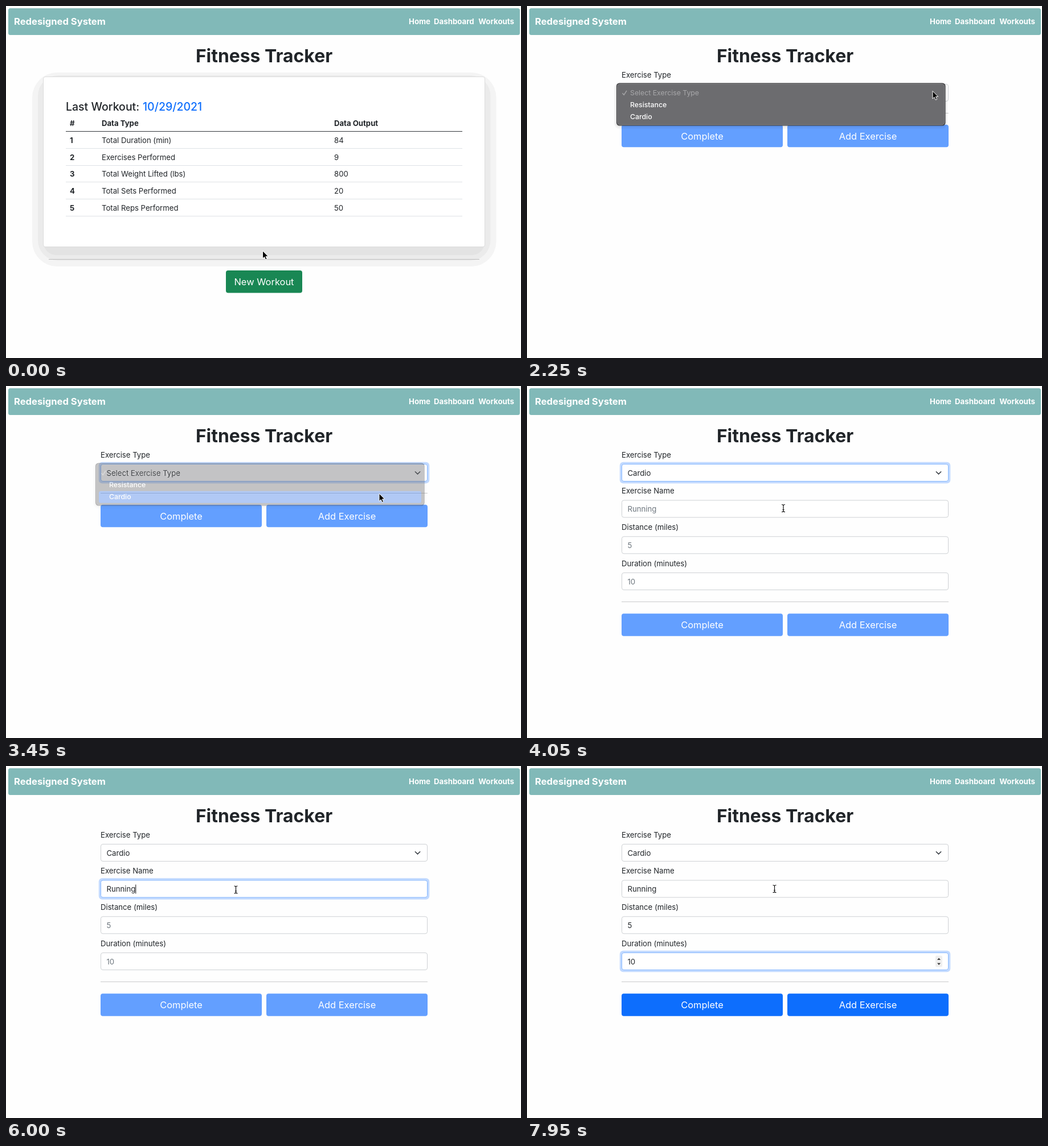
Animation, 904 px wide and 619 px high, one loop 8 s. Source, as an HTML page:

```html
<!DOCTYPE html>
<html lang="en">
<head>
<meta charset="utf-8">
<title>Fitness Tracker</title>
<style>
  html, body { margin: 0; width: 100%; height: 100%; overflow: hidden; background: #fefefe; }
  svg { display: block; width: 904px; height: 619px; }
  text { font: 13.15px Inter, "Liberation Sans", sans-serif; font-optical-sizing: none; fill: #212529; white-space: pre; }
</style>
</head>
<body>
<svg id="stage" viewBox="0 0 904 619"></svg>
<script>
const LOOP = 8000;
const stage = document.getElementById('stage');

// Each step changes part of the state and holds until the next one.
const steps = [
  [0, { page: 'home', cursor: 'arrow', x: 450.5, y: 430.5, type: 'Select Exercise Type',
        name: '', distance: '', duration: '', ring: 1, ready: 0 }],
  [150, { y: 453 }],
  [300, { x: 450, y: 491, cursor: 'hand', hover: true }],
  [600, { pressed: true }],
  [1050, { page: 'form', cursor: 'arrow' }],
  [1500, { x: 530, y: 440 }],
  [1650, { x: 690, y: 320 }],
  [1800, { x: 849, y: 225 }],
  [1950, { x: 795, y: 176 }],
  [2100, { x: 712, y: 149.5 }],
  [2250, { menu: 1 }],
  [2550, { x: 694, y: 166, pick: 1 }],
  [2700, { x: 668, y: 184, pick: 2 }],
  [2850, { x: 655, y: 189 }],
  [3450, { menu: .4, focus: 'type' }],
  [3600, { menu: 0, type: 'Cardio' }],
  [3750, { x: 625, y: 193 }],
  [3900, { x: 540, y: 207, cursor: 'beam' }],
  [4050, { x: 450, y: 215 }],
  [4200, { x: 403.5, y: 217.5 }],
  [4350, { focus: 'name', caret: true }],
  [4650, { caret: false }],
  [5100, { name: 'R', caret: true, popup: true }],
  [5250, { name: 'Ru' }],
  [5400, { name: 'Run' }],
  [5550, { name: 'Runn' }],
  [5700, { name: 'Runni' }],
  [5850, { name: 'Runnin' }],
  [6000, { name: 'Running', popup: false }],
  [6150, { focus: 'distance', ring: .5 }],
  [6300, { ring: 1 }],
  [6600, { caret: false }],
  [6750, { distance: '5', caret: true }],
  [7050, { focus: 'duration' }],
  [7200, { duration: '1', ready: .5 }],
  [7350, { duration: '10', ready: 1 }],
  [7800, { caret: false }],
  [7950, { x: 434.5, y: 216 }]
];
let last = {};
const states = steps.map(([at, change]) => last = { ...last, ...change, at });

const text = (x, y, s, attrs = '') => `<text x="${x}" y="${y}" ${attrs}>${s}</text>`;
const font = (size, weight = 400, fill = '#212529', anchor = 'start') =>
  `style="font-size:${size}px;font-weight:${weight};fill:${fill}" text-anchor="${anchor}"`;
const rect = (x, y, w, h, r, fill, attrs = '') =>
  `<rect x="${x}" y="${y}" width="${w}" height="${h}" rx="${r}" fill="${fill}" ${attrs}/>`;
const line = (x1, x2, y, color) => `<path d="M${x1} ${y}H${x2}" stroke="${color}"/>`;
const path = (d, attrs) => `<path d="${d}" ${attrs}/>`;

const header = () =>
  rect(4, 4, 898, 47, 3.5, '#81b9b8') +
  text(14, 33, 'Redesigned System', font(16.6, 700, '#fff')) +
  text(707, 32, 'Home', font(13.25, 700, '#fff')) +
  text(751, 32, 'Dashboard', font(13.25, 700, '#fff')) +
  text(892, 32, 'Workouts', font(13.25, 700, '#fff', 'end')) +
  text(453, 98.5, 'Fitness Tracker', font(31.9, 700, '#212529', 'middle'));

const button = (x, y, w, h, label, fill) =>
  rect(x, y, w, h, 4, fill) +
  text(x + w / 2, y + h / 2 + 6, label, font(16.45, 400, '#fff', 'middle'));

function home(s) {
  const rows = [['Total Duration (min)', 84], ['Exercises Performed', 9],
    ['Total Weight Lifted (lbs)', 800], ['Total Sets Performed', 20], ['Total Reps Performed', 50]];
  const bold = font(13.15, 700);
  return rect(46, 117, 814.5, 341, 44, '#f4f4f4') +
    rect(56, 122, 794.5, 326, 36, '#ebebeb') +
    rect(66, 130, 774, 308, 22, '#e3e3e3') +
    rect(65.5, 124.5, 775, 299, 3.5, '#fff', 'stroke="#dcdcdc"') +
    text(105, 183.5, 'Last Workout:', font(19.5, 500)) +
    text(240, 183.5, '10/29/2021', font(19.5, 500, '#0d6efd')) +
    text(112, 210.5, '#', bold) + text(168, 210.5, 'Data Type', bold) +
    text(576, 210.5, 'Data Output', bold) + line(105, 801, 220.5, '#33373b') +
    rows.map(([label, value], i) => {
      const y = 240.8 + i * 29.75;
      return text(112, y, i + 1, bold) + text(168, y, label) + text(576, y, value) +
        line(105, 801, Math.floor(y + 9.6) + .5, '#dee2e6');
    }).join('') +
    line(75, 831, 445.5, '#bdbdbd') +
    (s.pressed ? rect(382.5, 461.5, 141, 46.5, 7, '#9dccb6') : '') +
    button(386, 465, 134, 39.5, 'New Workout', s.hover ? '#157347' : '#198754');
}

function field(s, id, y, label, hint) {
  const focused = s.focus === id, value = s[id];
  let out = text(166, y - 11.3, label);
  if (focused) out += rect(162.8, y - 3.2, 580.4, 37.4, 6, `rgba(13,110,253,${.25 * s.ring})`);
  out += rect(166.5, y + .5, 573, 30, 3.5, '#fff', `stroke="${focused ? '#86b7fe' : '#ced1d4'}"`);
  out += text(176.5, y + 20.7, value || hint, value ? '' : font(13.15, 400, '#6c757d'));
  if (id === 'type')
    out += path('M718.3 150.7l4.2 4.2 4.2-4.2', 'fill="none" stroke="#343a40" stroke-width="1.5" stroke-linecap="round"');
  else if (focused) {
    if (hint !== 'Running')
      out += rect(717, y + 5.5, 12, 20, 2, '#efefef') +
        path(`M720 ${y + 13}l3-3.6 3 3.6zM720 ${y + 18.5}l3 3.6 3-3.6z`, 'fill="#3c3c3c"');
    if (s.caret)
      out += `<text id="typed" x="176.5" y="0" visibility="hidden">${value}</text>` +
        rect(176.5, y + 8, 1, 16, 0, '#111', 'id="caret"');
  }
  return out;
}

function menu(s) {
  const item = (i, label) => text(181, 157 + i * 21.2, label, font(12.3, i ? 500 : 400, i ? '#fff' : '#a8a8aa'));
  return `<g opacity="${s.menu}">` +
    rect(153, 135, 585, 81, 9, 'rgba(0,0,0,.035)') +
    rect(155, 135, 581, 78, 7, 'rgba(0,0,0,.05)') +
    rect(157, 135.5, 577.5, 75, 5.5, '#343436') +
    rect(158.5, 137, 574.5, 72, 4.5, '#6c6c6f', 'stroke="#858588"') +
    (s.pick ? rect(163, 163.5 + (s.pick - 1) * 21.2, 566, 21, 3.5, '#3f7be8') : '') +
    path('M167.5 153.2l2.7 3.2 4.8-7.6', 'fill="none" stroke="#a8a8aa" stroke-width="1.4"') +
    item(0, 'Select Exercise Type') + item(1, 'Resistance') + item(2, 'Cardio') + '</g>';
}

function form(s) {
  const cardio = s.type === 'Cardio', drop = cardio ? 191.5 : 0;
  const blue = ['#639fff', '#3887fe', '#0d6efd'][s.ready * 2];
  return field(s, 'type', 137, 'Exercise Type') +
    (cardio ? field(s, 'name', 200.5, 'Exercise Name', 'Running') +
      field(s, 'distance', 264.3, 'Distance (miles)', '5') +
      field(s, 'duration', 328, 'Duration (minutes)', '10') : '') +
    line(166, 740, cardio ? 379.5 : 188.5, '#c9cacb') +
    button(166, 208.8 + drop, 283, 39.5, 'Complete', blue) +
    button(457, 208.8 + drop, 283, 39.5, 'Add Exercise', blue) +
    (s.popup ? rect(164.5, 233.5, 178, 49, 5, 'rgba(0,0,0,.2)') +
      rect(165, 233.5, 177, 47.8, 4, '#2a2a2c') +
      text(176.5, 262, 'Running', font(12.2, 500, '#f4f4f4')) : '') +
    (s.menu ? menu(s) : '');
}

const cursors = {
  arrow: path('M0 0V13.6L3.1 10.8 5.2 15.6 7.6 14.6 5.5 9.9H9.7Z',
    'fill="#000" stroke="#fff" stroke-linejoin="round"'),
  hand: path('M-1.4 1Q0-.6 1.4 1V6L6 7Q8.4 7.5 8 10L7 15.5H-.5L-5 9.5Q-5 7.4-3 8.2L-1.4 10Z',
    'fill="#000" stroke="#fff" stroke-linejoin="round"'),
  beam: path('M-3-6.5Q0-6.5 0-4.5 0-6.5 3-6.5M0-5V5M-3 6.5Q0 6.5 0 4.5 0 6.5 3 6.5M-1.5 2.5H1.5',
    'fill="none" stroke="#111" stroke-width="1.2"')
};

function draw(s) {
  stage.innerHTML = header() + (s.page === 'home' ? home(s) : form(s)) +
    `<g transform="translate(${s.x} ${s.y})">${cursors[s.cursor]}</g>`;
  const caret = document.getElementById('caret');
  if (caret) {
    const typed = document.getElementById('typed');
    const width = typed.textContent ? typed.getComputedTextLength() : 0;
    caret.setAttribute('x', 176.5 + width);
  }
}

let shown;
function tick() {
  const t = performance.now() % LOOP;
  const state = states.findLast(s => s.at <= t);
  if (state !== shown) draw(shown = state);
  requestAnimationFrame(tick);
}
tick();
</script>
</body>
</html>
```
